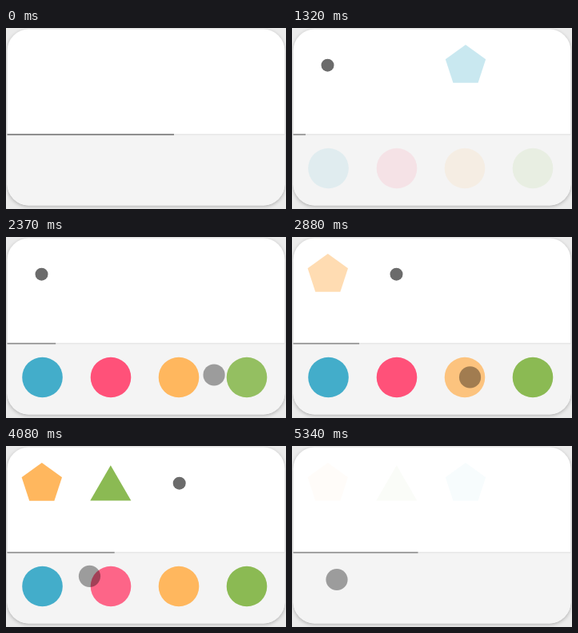
Animation of 350x227 px, one loop 5760 ms. Source, as an HTML page with a canvas:

```html
<!DOCTYPE html>
<html lang="en">
<head>
<meta charset="utf-8">
<title>Shape memory game</title>
<style>
  html, body { margin: 0; width: 100%; height: 100%; overflow: hidden; background: #ebebeb; }
  canvas { display: block; }
</style>
</head>
<body>
<canvas width="350" height="227"></canvas>
<script>
const ctx = document.querySelector('canvas').getContext('2d');
const LOOP = 5760, STEP = 30, LAST = 5340;
const BLUE = '#43adca', PINK = '#ff5179', ORANGE = '#ffb75e', GREEN = '#8bba53';

const buttons = [[45.5, BLUE], [131, PINK], [216, ORANGE], [301, GREEN]];
const BUTTON_Y = 176, BUTTON_R = 25.3;

const shapes = [
  { x: 44.8, sides: 5, color: ORANGE, click: 2760 },
  { x: 130.8, sides: 3, color: GREEN, click: 3435 },
  { x: 217, sides: 5, color: BLUE, click: 4515 },
];

// Cursor moves: start, end, from, to, arc height
const moves = [
  [1700, 2757, [364, 170], [222, 176], 1.8],
  [2850, 3350, [222, 176], [297, 175], 3],
  [3520, 4340, [297, 175], [56, 167.5], 8.8],
];

const ramp = (t, a, b) => Math.min(1, Math.max(0, (t - a) / (b - a)));
const ease = p => p < .5 ? 2 * p * p : 1 - 2 * (1 - p) ** 2;

function cursorAt(t) {
  const [a, b, from, to, arc] = moves.findLast(m => t >= m[0]) || moves[0];
  const p = ease(ramp(t, a, b));
  return [
    from[0] + (to[0] - from[0]) * p,
    from[1] + (to[1] - from[1]) * p - 4 * arc * p * (1 - p),
  ];
}

// Hover strength, averaged over the last moments for a soft transition
function hover(t, x) {
  let inside = 0;
  for (let i = 0; i < 12; i++) {
    const [cx, cy] = cursorAt(t - i * 12);
    if (Math.hypot(cx - x, cy - BUTTON_Y) < BUTTON_R) inside++;
  }
  return inside / 12;
}

function fill(color, alpha = 1) {
  ctx.globalAlpha = alpha;
  ctx.fillStyle = color;
  ctx.fill();
  ctx.globalAlpha = 1;
}

function disc(x, y, r, color, alpha) {
  ctx.beginPath();
  ctx.arc(x, y, r, 0, Math.PI * 2);
  fill(color, alpha);
}

function polygon({ x, sides, color }, alpha) {
  const r = sides === 5 ? 26.5 : 29.5;
  const y = sides === 5 ? 47.4 : 53.8;
  ctx.beginPath();
  for (let i = 0; i < sides; i++) {
    const a = i * 2 * Math.PI / sides;
    ctx.lineTo(x + r * Math.sin(a), y - r * Math.cos(a));
  }
  ctx.closePath();
  fill(color, alpha);
}

function shapeAlpha(t, i) {
  const preview = ramp(t, i * 130, 250 + i * 130) * (1 - ramp(t, 950 + i * 110, 1160 + i * 110));
  const click = shapes[i].click;
  const answer = ramp(t, click, click + 250) * (1 - ramp(t, 4710, 5367));
  return t < 1500 ? preview : answer;
}

function card() {
  ctx.fillStyle = '#ebebeb';
  ctx.fillRect(0, 0, 350, 227);
  ctx.beginPath();
  ctx.roundRect(1.5, 1.5, 347, 221, 27);
  ctx.save();
  ctx.shadowColor = 'rgba(0,0,0,.25)';
  ctx.shadowBlur = 4;
  ctx.shadowOffsetY = 1.5;
  fill('#fff');
  ctx.restore();
  ctx.save();
  ctx.clip();
  ctx.fillStyle = '#f4f4f4';
  ctx.fillRect(0, 134, 350, 90);
  ctx.fillStyle = '#e6e6e6';
  ctx.fillRect(0, 132.8, 350, 1.6);
  ctx.restore();
}

function timer(t) {
  const resetting = t < 540;
  const width = resetting
    ? 208.5 * (1 - ramp(t, 0, 520)) ** 2
    : .043 * Math.max(0, Math.min(t, 4588) - 960);
  ctx.fillStyle = resetting ? '#707070' : '#8a8a8a';
  ctx.fillRect(1.5, 132.8, width, 1.6);
}

function draw(t) {
  card();
  timer(t);
  shapes.forEach((s, i) => polygon(s, shapeAlpha(t, i)));

  const next = shapes.find(s => t < s.click);
  if (next) disc(next.x - .3, 46.7, 8, '#6b6b6b', ramp(t, 1110, 1230));

  const shown = ramp(t, 1275, 1680) * (1 - ramp(t, 4590, 4800));
  for (const [x, color] of buttons) {
    disc(x, BUTTON_Y, BUTTON_R, color, shown * (1 - .22 * hover(t, x)));
  }
  if (t >= moves[0][0]) disc(...cursorAt(t), 13.6, '#000', .36);
}

function frame(now) {
  const t = now % LOOP;
  draw(Math.min(LAST, Math.floor(t / STEP) * STEP));
  requestAnimationFrame(frame);
}
requestAnimationFrame(frame);
</script>
</body>
</html>
```
